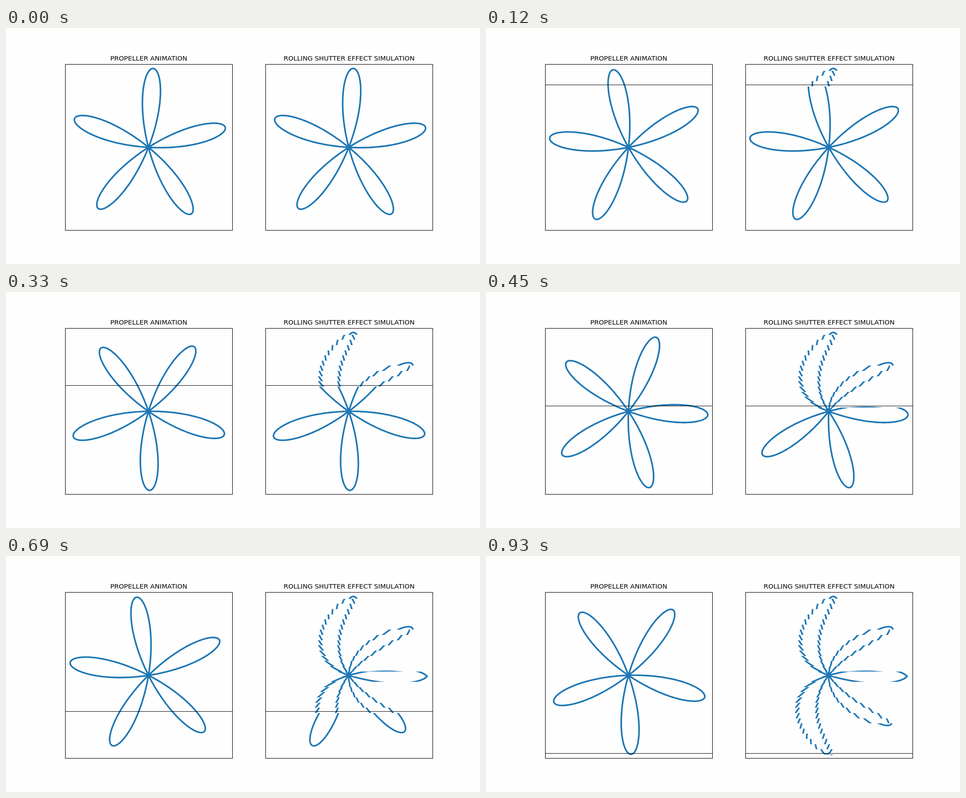
Write an HTML page that moves like this. It is 1058 px wide and 529 px high and loops after 0.96 s.

```html
<!DOCTYPE html>
<html lang="en">
<head>
<meta charset="utf-8">
<title>Rolling shutter</title>
<style>
  html, body { margin: 0; width: 100%; height: 100%; overflow: hidden; background: #fefefe; }
  svg { display: block; width: 1058px; height: 529px; }
  text { font: 14.69px "DejaVu Sans", sans-serif; text-anchor: middle; fill: #000; }
  .rose { fill: none; stroke: #1f77b4; stroke-width: 3.6; stroke-linejoin: round; }
  .box, .scan { fill: none; stroke: #000; stroke-width: 1.1; }
</style>
</head>
<body>
<svg id="stage" viewBox="0 0 1058 529"></svg>
<script>
const STEPS = 32, STEP_MS = 30;
const RADIUS = 177.1, CY = 267.5;
const START = 86.65, TURN = 3.652;   // degrees, counter-clockwise
const LEFT = 132.5, TOP = 81.5, WIDTH = 373, HEIGHT = 372, GAP = 447;
const CX = 318;

const stage = document.getElementById('stage');

function add(parent, tag, attrs, text) {
  const el = document.createElementNS('http://www.w3.org/2000/svg', tag);
  for (const key in attrs) el.setAttribute(key, attrs[key]);
  if (text) el.textContent = text;
  return parent.appendChild(el);
}

// Five-petal rose r = cos(5a), one petal pointing along +x
function rosePath() {
  const points = [], count = 720;
  for (let i = 0; i < count; i++) {
    const a = Math.PI * i / count;
    const r = RADIUS * Math.cos(5 * a);
    points.push((r * Math.cos(a)).toFixed(2) + ' ' + (-r * Math.sin(a)).toFixed(2));
  }
  return 'M' + points.join('L') + 'Z';
}

const shape = rosePath();
const pose = (cx, k) => `translate(${cx} ${CY}) rotate(${-(START + TURN * k)})`;
const scanY = k => Math.floor(81 + 11.65 * k) + 0.5;
const cutY = k => k === 0 ? 82 : Math.round(83.9 + 11.65 * k);

const defs = add(stage, 'defs', {});

function strip(id, y, h) {
  const clip = add(defs, 'clipPath', { id });
  const rect = add(clip, 'rect', { x: LEFT + GAP, y, width: WIDTH, height: h });
  const group = add(stage, 'g', { 'clip-path': `url(#${id})` });
  const rose = add(group, 'path', { class: 'rose', d: shape });
  return { rect, group, rose };
}

function panel(dx, title) {
  add(stage, 'text', { x: 318.8 + dx, y: 73.4 }, title);
  add(stage, 'rect', { class: 'box', x: LEFT + dx, y: TOP, width: WIDTH, height: HEIGHT });
  return add(stage, 'line', { class: 'scan', x1: LEFT + dx, x2: LEFT + WIDTH + dx });
}

const spinner = add(stage, 'path', { class: 'rose', d: shape });
const frozen = [];
for (let k = 0; k < STEPS - 1; k++) {
  const s = strip('cut' + k, cutY(k), cutY(k + 1) - cutY(k));
  s.rose.setAttribute('transform', pose(CX + GAP, k));
  frozen.push(s.group);
}
const live = strip('live', TOP, HEIGHT);
const scans = [
  panel(0, 'PROPELLER ANIMATION'),
  panel(GAP, 'ROLLING SHUTTER EFFECT SIMULATION')
];

function show(k) {
  spinner.setAttribute('transform', pose(CX, k));
  live.rose.setAttribute('transform', pose(CX + GAP, k));
  live.rect.setAttribute('y', cutY(k));
  live.rect.setAttribute('height', TOP + HEIGHT - cutY(k));
  frozen.forEach((g, i) => g.setAttribute('display', i < k ? 'inline' : 'none'));
  for (const line of scans) {
    line.setAttribute('y1', scanY(k));
    line.setAttribute('y2', scanY(k));
  }
}

let shown = -1;
function tick() {
  const k = Math.floor(performance.now() / STEP_MS) % STEPS;
  if (k !== shown) show(shown = k);
  requestAnimationFrame(tick);
}
show(0);
tick();
</script>
</body>
</html>
```
